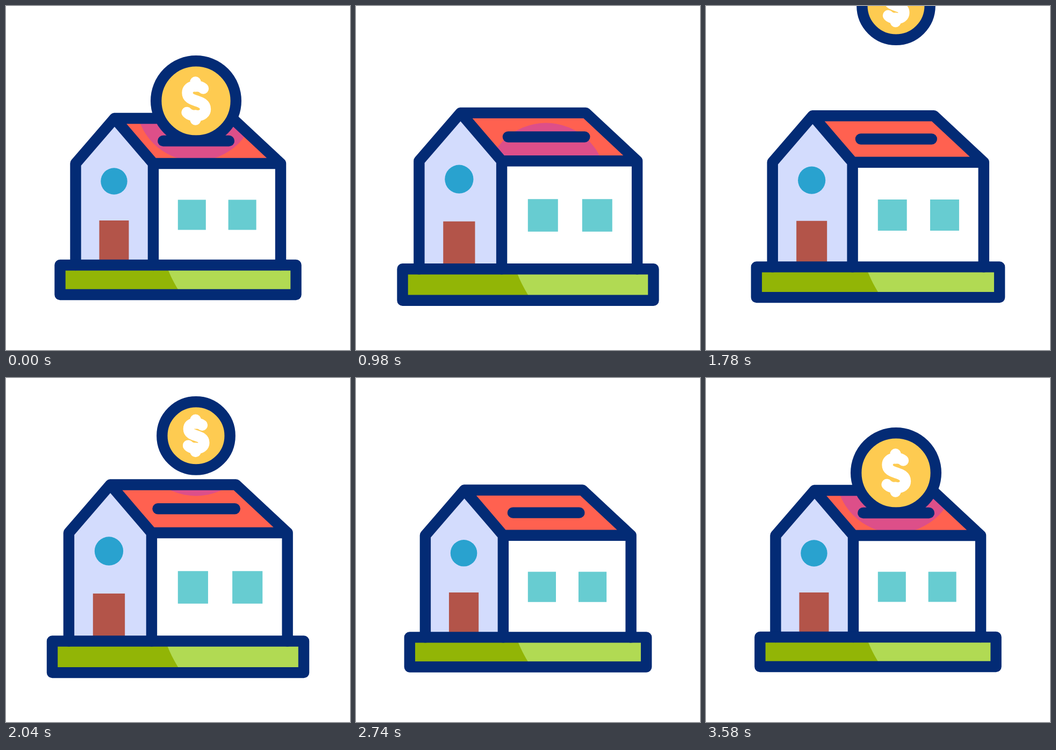
An HTML page that plays this animation: 640x640 px, repeating every 3600 ms.

```html
<!DOCTYPE html>
<html lang="en">
<head>
<meta charset="utf-8">
<title>Coin house</title>
<style>
  html, body { margin: 0; width: 100%; height: 100%; overflow: hidden; background: #fff; }
  svg { display: block; width: 100%; height: 100%; }
  .line { fill: none; stroke: #032b75; stroke-width: 20.4; stroke-linecap: round; stroke-linejoin: round; }
  .line, .line * { vector-effect: non-scaling-stroke; }
</style>
</head>
<body>
<svg viewBox="0 0 640 640">
  <defs>
    <clipPath id="roofClip"><path class="house" d="M202 209H421L511 293H274Z"/></clipPath>
    <clipPath id="slotClip"><rect id="above" x="0" y="-200" width="640" height="451"/></clipPath>
  </defs>

  <g class="house">
    <path fill="#fff" d="M274 293H511V482H274Z"/>
    <path fill="#d3dcfd" d="M129.5 482V293L202 209L274 293V482Z"/>
    <path fill="#ff6150" d="M202 209H421L511 293H274Z"/>
    <path fill="#b1da53" d="M100.5 482H539.5V537H100.5Z"/>
    <path fill="#92b506" d="M100.5 482H298.5Q306 506 326 537H100.5Z"/>
  </g>
  <g clip-path="url(#roofClip)"><circle id="shade" cx="353.5" r="112" fill="#dd4f89"/></g>
  <g id="details">
    <circle cx="201" cy="326" r="24.7" fill="#29a2cf"/>
    <path fill="#b35449" d="M173.5 399H228.5V480H173.5Z"/>
    <path fill="#67ccd1" d="M319.8 360.5H371.8V416.5H319.8ZM413.6 360.5H465.6V416.5H413.6Z"/>
  </g>
  <g class="house line">
    <path d="M129.5 482V293L202 209L274 293V482M202 209H421L511 293V482M274 293H511"/>
    <path d="M100.5 482H539.5V537H100.5Z"/>
  </g>

  <g clip-path="url(#slotClip)">
    <circle id="gold" cx="353.5" fill="#fecb51"/>
    <g id="coin" class="line">
      <circle r="74.3"/>
      <path stroke="#fff" style="stroke:#fff" d="M13.5 -23C6 -30 -16 -30 -16 -15C-16 4 17.5 -4 17.5 15.5C17.5 31 -9 31 -17 21.5M-1 -35V-27M-1 27V35"/>
    </g>
  </g>
  <path id="slot" class="line"/>
</svg>

<script>
const LOOP = 3600, REST = 176.5, SMALL = 0.85, SWELL = 0.068;
const PULSE = [522, 1067, 1507, 2100, 2700, 3020, 3600];

const $ = id => document.getElementById(id);
const houses = document.querySelectorAll('.house');
const ramp = (t, a, b) => Math.min(1, Math.max(0, (t - a) / (b - a)));
const smooth = u => u * u * (3 - 2 * u);
const mix = (a, b, u) => a + (b - a) * u;

// The house swells and shrinks between alternating keys.
function swell(t) {
  return SWELL * PULSE.slice(1).reduce((sum, end, i) =>
    sum + (i % 2 ? -1 : 1) * smooth(ramp(t, PULSE[i], end)), 0);
}

// Three drops: lift and fall, fall through, fall to rest in the slot.
function coinAt(t) {
  if (t < 580) {
    const u = ramp(t, 200, 580), p = (u + smooth(u)) / 2;
    return { y: mix(REST, 114, p), size: mix(1, SMALL, p) };
  }
  if (t < 1290) return { y: 114 + 61 * ((t - 580) / 180) ** 1.576, size: SMALL };
  if (t < 2600) return { y: -81 + 0.000334 * (t - 1290) ** 2, size: SMALL };
  const fall = -92.3 + 280 * ((t - 2600) / 1000) ** 2;
  return { y: Math.min(REST, fall), size: mix(SMALL, 1, smooth(ramp(t, 3380, 3575))) };
}

const scaleAbout = (k, cy, dy) =>
  `translate(320 ${cy + dy}) scale(${k}) translate(-320 ${-cy})`;

function draw(t) {
  const s = swell(t);
  const bump = Math.sin(Math.PI * ramp(t, 3040, 3280)) ** 2;
  const hop = -7.4 * bump;
  const { y, size } = coinAt(t);

  houses.forEach(h => h.setAttribute('transform', scaleAbout(1 + s, 368.5, hop)));
  $('details').setAttribute('transform', scaleAbout(1 + 1.21 * s, 375.5, hop));

  const slotY = 251 - 117.5 * s + hop;
  const half = 61.2 * (1 + 2.57 * s);
  const mid = 353.6 + 8 * s;
  $('slot').setAttribute('d', `M${mid - half} ${slotY}H${mid + half}`);
  $('above').setAttribute('height', 200 + slotY);

  $('shade').setAttribute('cy', y);
  $('gold').setAttribute('cy', y + 17.5 * bump);
  $('gold').setAttribute('r', 74.3 * size);
  $('coin').setAttribute('transform', `translate(353.5 ${y}) scale(${size})`);
}

const start = performance.now();
function tick() {
  draw((performance.now() - start) % LOOP);
  requestAnimationFrame(tick);
}
tick();
</script>
</body>
</html>
```
